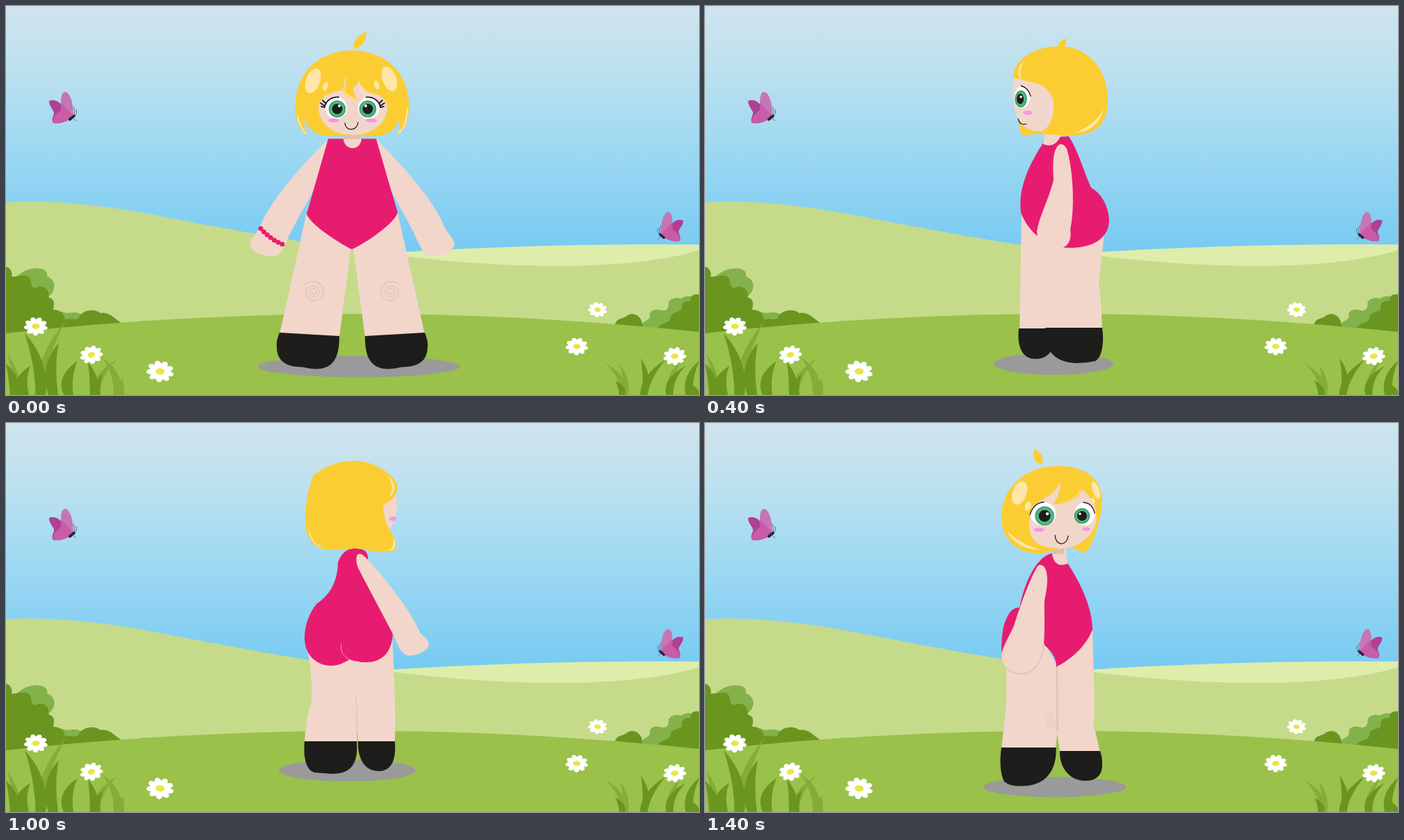
Write an HTML page that moves like this. It is 998 px wide and 561 px high and loops after 1600 ms.

```html
<!DOCTYPE html>
<html lang="en">
<head>
<meta charset="utf-8">
<title>Doll turnaround</title>
<style>
html, body { margin: 0; width: 100%; height: 100%; overflow: hidden; }
svg { display: block; width: 100vw; height: 100vh; }
.skin { fill: #f2d6cb; }
.shade { fill: #dcc0b4; }
.suit { fill: #e71c70; }
.hair { fill: #fbcd33; }
.shine { fill: #fee7a8; }
.shoe, .pupil { fill: #1d1d1b; }
.shadow { fill: #9a9a9a; }
.iris { fill: #4fb783; stroke: #359a6b; stroke-width: 1.5; }
.white { fill: #fff; }
.blush { fill: #f598e0; }
.ink { fill: none; stroke: #1d1d1b; stroke-width: 1.3; stroke-linecap: round; }
.lash { stroke-width: 1.8; }
.fold { fill: none; stroke: #dfc3b7; stroke-width: 1.3; }
.beads { fill: none; stroke: #e71c70; stroke-width: 7; stroke-linecap: round; stroke-dasharray: 0 6.4; }
.glint { fill: none; stroke: #fee7a8; stroke-width: 2; stroke-linecap: round; }
.dark { fill: #6a9620; }
.light { fill: #83b24a; }
.pose {
  visibility: hidden;
  animation: show 1.6s step-end infinite;
  animation-delay: calc(var(--i) * .2s - 1.6s);
}
@keyframes show {
  0% { visibility: visible; }
  12.5%, 100% { visibility: hidden; }
}
</style>
</head>
<body>
<svg viewBox="0 0 998 561" preserveAspectRatio="none">
<defs>
  <linearGradient id="sky" x1="0" y1="0" x2="0" y2="1">
    <stop offset="0" stop-color="#d0e4ee"/>
    <stop offset=".25" stop-color="#bce0ef"/>
    <stop offset=".52" stop-color="#a0d9f2"/>
    <stop offset="1" stop-color="#70c8f3"/>
  </linearGradient>

  <g id="butterfly">
    <path fill="#b04093" d="M62,137C70,133 78,139 83,146L98,158C90,166 80,170 68,169C64,162 70,158 69,153C66,147 62,143 62,137Z"/>
    <path fill="#c776b5" d="M97,159C88,156 79,150 79,138C79,128 82,123 86,124C93,126 97,141 97,159Z"/>
    <path fill="#c85ca7" d="M79,140C83,143 91,151 97,159C90,166 80,170 68,169C65,163 72,155 79,150Z"/>
    <path d="M92,163.500L98,158.500" stroke="#2b2530" stroke-width="4" stroke-linecap="round"/>
    <path d="M98,158Q100,151 97,145M98,158Q103,157 101,149M96,161L101,166" fill="none" stroke="#4a4450" stroke-width=".7"/>
  </g>

  <path id="swirl" class="fold" d="M-15,-9C-8,-17 14,-17 14,-1C14,17 -11,17 -11,1C-11,-11 8,-11 8,0C8,10 -6,10 -6,1C-6,-6 4,-6 4,1C3,5 -2,5 -2,1"/>

  <g id="limbs">
    <path class="skin" d="M464,192C430,225 385,275 367,315C364,325 352,335 351,344C353,355 370,361 385,361C396,360 398,350 404,340C412,320 430,290 445,262L480,220Z"/>
    <path class="skin" d="M433,298L394,473L480,477L497,349Z"/>
    <path class="shoe" d="M394,471L480,476C480,500 476,523.500 446,523.500C436,523.500 430,520.500 424,520.500C400,520.500 390,508 390,493C389,485 391,478 394,471Z"/>
  </g>
  <g id="both">
    <use href="#limbs"/>
    <use href="#limbs" transform="matrix(-1 0 0 1 997 0)"/>
  </g>
  <g id="mop" class="hair">
    <path d="M434,187C420,178 415,158 417,138C419,92 455,64 498.500,64C542,64 578,92 580,138C582,158 577,178 562,187C567,178 568,170 567,162C562,180 548,187.500 530,187.500L467,187.500C450,187.500 435,180 430,162C429,170 430,178 434,187Z"/>
    <path d="M501,62C499,50 507,42 519,37C519,47 516,59 501,62Z"/>
  </g>

  <g id="front">
    <use href="#both"/>
    <use href="#swirl" x="443" y="412"/>
    <use href="#swirl" transform="matrix(-1 0 0 1 554 412)"/>
    <path class="beads" d="M367,321Q381,337 400,344.500"/>
    <path class="suit" d="M464,191.500H533L564,298C558,315 520,340 502,349Q498,351.500 495,349.500C477,340 438,315 433,300Z"/>
    <path class="skin" d="M486,191A13,14 0 0 0 512,191Z"/>
    <path class="shade" d="M487,183H511V192H487Z"/>
    <use href="#mop"/>
    <path class="skin" d="M450,148C450,132 463,125 486,121C498,120 505,117 508,108C512,119 520,125 535,128C546,132 549,140 549,148C547,172 525,186 499,186C473,186 452,172 450,148Z"/>
    <path class="hair" d="M483,110C482,124 490,133 507,135C501,128 498,118 499,104Z"/>
    <path class="skin" d="M491,100C486,107 485,115 488,123C488,113 490,108 491,100Z"/>
    <path class="glint" style="stroke-width:1.200" d="M485,118Q490,131 504,134M508,109Q510,124 521,132"/>
    <g class="shine">
      <ellipse cx="442" cy="108" rx="10" ry="18.500" transform="rotate(20 442 108)"/>
      <ellipse cx="460" cy="116" rx="3.500" ry="6.500" transform="rotate(20 460 116)"/>
      <ellipse cx="552" cy="105" rx="10" ry="18.500" transform="rotate(-20 552 105)"/>
      <ellipse cx="534" cy="114" rx="3.500" ry="6.500" transform="rotate(-20 534 114)"/>
    </g>
    <path class="glint" d="M420,160Q424,177 432,184M578,148Q577,172 566,183"/>
    <g id="eye">
      <ellipse class="white" cx="475.500" cy="147" rx="15.500" ry="16"/>
      <circle class="iris" cx="477" cy="148.500" r="11.500"/>
      <circle class="pupil" cx="477" cy="148.500" r="7.500"/>
      <path class="ink lash" d="M459,145C461,136 469,131 479,131.500M459,144L453,140M459,146L454,145M461,141L456,136"/>
      <ellipse class="blush" cx="472" cy="165" rx="8" ry="3"/>
    </g>
    <use href="#eye" transform="matrix(-1 0 0 1 998 0)"/>
    <circle class="white" cx="480" cy="144" r="2"/>
    <circle class="white" cx="518" cy="144" r="2"/>
    <path class="ink" d="M488,169C489,181 506,181 507,168"/>
  </g>

  <g id="turned">
    <path class="skin" d="M440,296C439,340 437,380 437,420L439,432L429,474H487L491,446V340Z"/>
    <path class="shoe" d="M429,473H487C488,495 475,516 450,516C432,516 425,505 426,490C426,484 427,478 429,473Z"/>
    <path class="skin" d="M490.500,350V445L493,469H571L564,405V340L510,315Z"/>
    <path class="fold" style="stroke-width:2.500" d="M491,350L490.500,445"/>
    <path class="shoe" d="M492.500,468H571C574,485 573,507 567,517C560,523 552,524 542,523.500C510,524 491,504 492.500,468Z"/>
    <use href="#swirl" transform="translate(500 430) scale(.55 .8)"/>
    <path class="suit" d="M477,201C460,225 440,265 440,298C448,318 465,338 492,351.500C492,338 500,327 512,318L545,290L571,333C571,300 568,290 562,278C558,270 552,266 545,266C540,240 525,195 499,188Z"/>
    <path class="skin" d="M479,178H498V190C495,204 488,207 476,203Z"/>
    <path class="shade" d="M479,178H498V189H482Z"/>
    <path class="skin" d="M513,205C505,208 502,225 509,255C510,270 508,285 510,320C512,345 525,362 545,362C560,361 571,350 571,333C568,320 556,300 553,292C545,265 530,225 520,208Q517,203 513,205Z"/>
    <path class="fold" style="stroke-width:1.800" d="M510,318C512,345 525,362 542,362Q556,361 564,354"/>
    <path class="hair" d="M453,188C440,178 437,163 433,150C425,125 424,102 431,90C440,70 465,62 490,62C538,62 571,95 571,135C572,165 550,188 520,188C510,188 500,186 494,182L468,180C462,182 458,186 453,188Z"/>
    <path class="skin" d="M434,140L437,118C440,108 448,104 454,96C460,108 472,115 484,117H497C490,108 485,95 486,84C490,95 500,105 515,112C528,120 532,135 531,152C529,171 515,181 487,181C465,181 440,168 434,140Z"/>
    <path class="glint" style="stroke-width:1.200" d="M457,97Q466,113 486,116"/>
    <g class="shine">
      <ellipse cx="435" cy="97" rx="5" ry="13" transform="rotate(18 435 97)"/>
      <ellipse cx="439" cy="112" rx="2.300" ry="4.500" transform="rotate(18 439 112)"/>
      <ellipse cx="545" cy="101" rx="10" ry="17.500" transform="rotate(-20 545 101)"/>
      <ellipse cx="533" cy="120" rx="4" ry="7" transform="rotate(-20 533 120)"/>
      <path d="M512,184Q548,173 564,154Q552,182 512,184Z"/>
    </g>
    <path class="hair" d="M513,60C509,50 514,43 523,37C526,46 527,56 513,60Z"/>
    <ellipse class="white" cx="451" cy="131" rx="14.500" ry="16.500"/>
    <ellipse class="white" cx="511" cy="131" rx="18.500" ry="17"/>
    <circle class="iris" cx="455" cy="134" r="10.500"/>
    <circle class="iris" cx="509" cy="134" r="13"/>
    <circle class="pupil" cx="455" cy="134" r="7"/>
    <circle class="pupil" cx="509" cy="134" r="8.500"/>
    <circle class="white" cx="458" cy="131" r="1.800"/>
    <circle class="white" cx="505" cy="131" r="2.200"/>
    <path class="ink" d="M437,130C439,120 445,115 453,114.500M510,114C521,115 527,122 530,132"/>
    <ellipse class="blush" cx="449" cy="153" rx="6" ry="2.700"/>
    <ellipse class="blush" cx="517" cy="154" rx="8" ry="3"/>
    <path class="ink" d="M475,163C477,178 493,178 494,162"/>
  </g>

  <g id="side">
    <path class="skin" d="M456,296L453,466H505L515,340Z"/>
    <path class="shoe" d="M452,465H505C506,490 498,509 476,509C456,509 449,490 452,465Z"/>
    <path class="skin" d="M492,330L490,466H572C571,440 570,415 567,400L576,320Z"/>
    <path class="shoe" d="M490,464H572C575,485 572,507 562,512Q550,515 537,515C505,515 487,498 490,464Z"/>
    <path class="suit" d="M492,190C468,225 450,262 455,298C464,322 484,342 512,348C546,352 582,342 582,308C580,285 570,270 556,262C546,240 538,210 524,188Z"/>
    <path class="skin" d="M490,178H512V188C506,200 498,204 487,199Z"/>
    <path class="skin" d="M510,200C502,205 500,225 502,250C497,275 481,303 478,325C478,345 495,353 510,350C525,348 528,335 526,322C533,290 530,235 521,206Q516,197 510,200Z"/>
    <path class="hair" d="M444,100C446,76 476,58 510,58C556,58 582,97 580,140C579,170 562,186 530,187C512,187 488,184 472,185C465,187 459,187 455,184C452,178 453,171 455,165Z"/>
    <path class="skin" d="M446,104C441,122 443,140 448,154C452,173 466,181 484,181C497,175 503,160 502,140C500,122 486,112 470,110Z"/>
    <path class="shine" d="M460,78C449,88 449,102 456,107C453,97 454,87 460,78ZM532,183Q562,172 574,148Q566,181 532,183Z"/>
    <path class="hair" d="M511,61C507,55 511,50 519,47C522,53 521,59 511,61Z"/>
    <ellipse class="white" cx="457" cy="131" rx="11" ry="16"/>
    <ellipse class="iris" cx="455" cy="134" rx="8" ry="11.500"/>
    <ellipse class="pupil" cx="454" cy="134" rx="5" ry="7.500"/>
    <circle class="white" cx="455" cy="131" r="1.800"/>
    <path class="ink" d="M455,115Q465,117 469,130"/>
    <ellipse class="blush" cx="465" cy="154" rx="7" ry="3"/>
    <path class="ink" d="M451,163Q454,173 463,170"/>
  </g>

  <g id="away">
    <path class="skin" d="M462,300C460,350 456,410 458,460H511L514,390V330Z"/>
    <path class="shoe" d="M458,459H511C512,483 502,502 482,502C462,502 456,485 458,459Z"/>
    <path class="skin" d="M513,335V460H588C587,440 584,420 579,405C576,390 578,360 584,325Z"/>
    <path class="fold" style="stroke-width:1" d="M513.500,392L512.500,458"/>
    <path class="shoe" d="M513,459H588C590,480 587,500 574,504Q562,505 548,506C522,506 510,492 513,459Z"/>
    <path class="suit" d="M497,196C496,184 505,181 515,181C530,181 535,190 540,201C540,225 550,248 570,260C580,272 588,290 588,310C588,335 570,350 550,350C538,350 530,345 523,341C515,344 505,345 498,345C478,345 462,332 461,303L490,240Z"/>
    <path d="M523,341C532,337 537,330 535,318" fill="none" stroke="#f5a0c2"/>
    <path class="skin" d="M512,190C515,195 513,205 510,211L461,304C454,318 450,335 436,335.500C425,335 409,328 409,319C410,312 416,308 421,304C435,270 475,220 500,194Q508,186 512,190Z"/>
    <path class="skin" d="M456,104C453,122 457,142 467,156L480,150V110Z"/>
    <ellipse class="blush" cx="461" cy="138" rx="5.500" ry="3"/>
    <path class="hair" d="M454,95C453,79 484,54.500 517,54.500C539,54.500 559,63 575,75C583,95 588,120 587,142C587,165 575,183 550,183C530,183 515,178 495,184C480,187 465,187 457,183C454,175 458,165 464,157C472,145 474,130 475,118C465,115 457,106 454,95Z"/>
    <path class="shine" d="M469,76C456,84 455,101 467,107C460,99 460,86 469,76ZM461,163C454,177 458,185 470,184C461,183 458,175 461,163ZM583,145C583,166 573,178 562,180C575,174 581,162 583,145Z"/>
  </g>

  <g id="back">
    <use href="#both"/>
    <path class="beads" d="M597,341.500Q614,339 633,323.500"/>
    <path class="skin" d="M488,184H509V192H488Z"/>
    <path class="suit" d="M464,191.500H533L564,298C567,330 550,350 522,350Q508,351 499,349Q490,350 480,350C450,350 430,330 433,298Z"/>
    <path d="M433,298H564" stroke="#ec4186"/>
    <use href="#mop"/>
    <path class="shine" d="M469,75C447,81 427,100 426,128C432,106 447,87 469,75ZM555,94C569,108 574,123 575,146C578,122 570,104 555,94Z"/>
  </g>

  <g id="daisy">
    <circle r="12" fill="#fff"/>
    <ellipse rx="6.500" ry="5.800" fill="#e9e645"/>
  </g>
</defs>

<rect width="998" height="380" fill="url(#sky)"/>
<path fill="#deedaa" d="M520,358C650,349 820,342 998,344V420H520Z"/>
<path fill="#c5db8a" d="M0,283C75,279 150,289 220,302.500C340,326 440,344 570,360.500C720,379 900,383 998,352V500H0Z"/>
<path class="light" d="M6,392C16,393 22,382 33,380C46,376 62,379 59,390C72,394 73,410 62,418L60,440C70,433 84,446 95,442C108,441 118,448 112,458L0,485Z"/>
<path class="dark" d="M0,376C7,377 10,386 8,390C16,392 31,384 35,394C38,402 35,405 42,407C52,400 65,410 61,420C72,423 69,432 68,438C82,438 88,450 84,460V485H0ZM80,475V460C84,446 96,454 104,451C108,439 126,435 136,443C150,440 156,452 168,458V475ZM188,457Q198,452 209,456V465H188Z"/>
<path class="light" d="M914,470V462C918,452 929,454 927,446C928,436 938,437 944,439C952,441 955,434 954,428C957,421 966,420 972,422C980,416 990,418 998,424V480Z"/>
<path class="dark" d="M877,470V460C879,449 889,452 895,446C907,440 920,450 916,470ZM938,475V467C941,455 952,460 957,451C957,441 966,443 973,438C972,428 978,424 986,426C984,418 991,415 998,416V480Z"/>
<path fill="#9ac14a" d="M0,472C170,453 340,444 510,444C700,444 860,456 998,470V561H0Z"/>
<use href="#butterfly"/>
<use href="#butterfly" transform="translate(1033 182) scale(-.93 .93)"/>
<g id="grass"></g>
<g id="flowers"></g>

<g class="pose" style="--i:0"><ellipse class="shadow" cx="508.500" cy="520" rx="145.500" ry="15.500"/><use href="#front"/></g>
<g class="pose" style="--i:1"><ellipse class="shadow" cx="499" cy="525" rx="98" ry="14.500"/><use href="#turned"/></g>
<g class="pose" style="--i:2"><ellipse class="shadow" cx="502" cy="516" rx="86" ry="16"/><use href="#side"/></g>
<g class="pose" style="--i:3"><ellipse class="shadow" cx="508" cy="505" rx="76" ry="16"/><use href="#away"/></g>
<g class="pose" style="--i:4"><ellipse class="shadow" cx="500.500" cy="526" rx="146.500" ry="15.500"/><use href="#back"/></g>
<g class="pose" style="--i:5"><ellipse class="shadow" cx="491.500" cy="501" rx="98.500" ry="16"/><use href="#away" transform="matrix(-1 0 0 1 1018 0)"/></g>
<g class="pose" style="--i:6"><ellipse class="shadow" cx="502" cy="507" rx="90" ry="16"/><use href="#side" transform="matrix(-1 0 0 1 1008 0)"/></g>
<g class="pose" style="--i:7"><ellipse class="shadow" cx="504" cy="525" rx="103" ry="14.500"/><use href="#turned" transform="matrix(-1 0 0 1 998 0)"/></g>
</svg>
<script>
const byId = id => document.getElementById(id);

// tip x, tip y, base x, half width, bend
const blade = color => ([tx, ty, bx, w, bend]) => {
  const cx = bx + bend, cy = ty + (561 - ty) * .45;
  return `<path fill="${color}" d="M${bx - w},561Q${cx - w * 1.6},${cy} ${tx},${ty}Q${cx + w * 1.6},${cy} ${bx + w},561Z"/>`;
};
const pale = [
  [86, 454, 46, 5, 6], [2, 502, 16, 4, 0], [160, 509, 128, 5, 2], [138, 506, 160, 5, 4],
  [168, 538, 166, 4, -2], [862, 514, 890, 4, 2], [884, 517, 893, 3, 2], [971, 513, 956, 4, -2]
];
const deep = [
  [27, 472, 50, 7, 2], [76, 486, 68, 7, -10], [0, 516, 12, 6, 2], [35, 519, 26, 7, -10],
  [103, 512, 90, 7, -8], [118, 514, 126, 5, 3], [140, 530, 132, 4, -4],
  [914, 508, 920, 4, 5], [951, 509, 918, 5, 4], [877, 540, 887, 4, 2],
  [979, 519, 956, 5, -4], [999, 511, 984, 5, -4], [982, 543, 994, 4, 0]
];
byId("grass").innerHTML = pale.map(blade("#85ac38")).join("") + deep.map(blade("#6a9620")).join("");

const petals = Array.from({ length: 9 }, (_, k) =>
  `<ellipse cx="12.500" rx="7.500" ry="5" fill="#fff" transform="rotate(${k * 40 + 12})"/>`).join("");
byId("daisy").insertAdjacentHTML("afterbegin", petals);

const daisies = [[43, 462, .86, 0], [123, 503, .84, -12], [222, 527, 1, 5],
  [852, 438, .69, 5], [822, 491, .82, 0], [963, 505, .84, -8]];
byId("flowers").innerHTML = daisies.map(([x, y, s, a]) =>
  `<use href="#daisy" transform="translate(${x} ${y}) rotate(${a}) scale(${s} ${s * .78})"/>`).join("");
</script>
</body>
</html>
```
